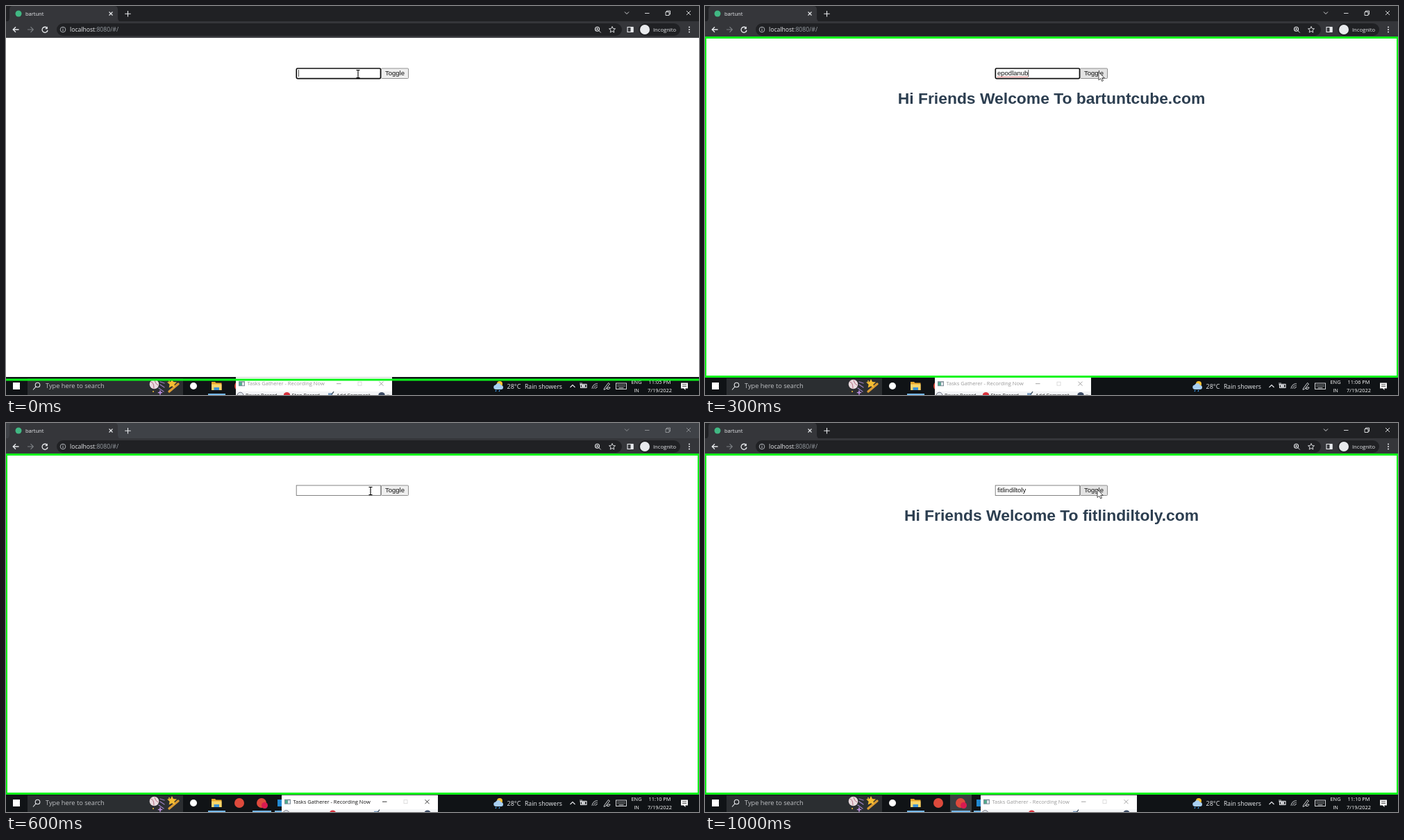
Animation, 998 px wide and 561 px high, one loop 1.1 s. Source, as an HTML page:

```html
<!DOCTYPE html>
<html lang="en">
<head>
<meta charset="utf-8">
<title>Toggle demo</title>
<style>
  html, body { margin: 0; width: 100%; height: 100%; overflow: hidden; background: #fff; }
  svg { display: block; width: 100vw; height: 100vh; }
  text { font-family: "Open Sans", "Noto Sans", sans-serif; fill: #e8eaed; white-space: pre; }
  .page text { font-family: "Liberation Sans", Arial, sans-serif; font-size: 9.5px; fill: #111; }
  .page #heading { font-size: 22.87px; font-weight: bold; fill: #2c3e50; text-anchor: middle; }
  .line { fill: none; stroke: #e8eaed; stroke-width: 1.1; }
  .mid { text-anchor: middle; }
  .clock text { font-size: 7.4px; text-anchor: middle; fill: #fff; }
  .recorder text { font-size: 7.5px; }
  .recorder .tool { font-size: 7.2px; fill: #222; }
  #frame { fill: none; stroke: #0bf51b; stroke-width: 3; }
</style>
</head>
<body>
<svg viewBox="0 0 998 561" preserveAspectRatio="none">
  <rect width="998" height="561" fill="#fff"/>

  <!-- browser -->
  <rect id="titlebar" width="998" height="23" fill="#202124"/>
  <path d="M0 22.5Q5 22.5 5 17V5Q5 0 10 0H156Q161 0 161 5V17Q161 22.5 166 22.5Z" fill="#35363a"/>
  <rect y="22" width="998" height="24" fill="#35363a"/>
  <rect y="45" width="998" height="1" fill="#4b4c50"/>
  <rect x="73" y="25" width="814" height="18" rx="9" fill="#202124"/>
  <rect x="911" y="25" width="60" height="18" rx="9" fill="#202124"/>
  <circle cx="18" cy="11" r="4.5" fill="#41b883"/>
  <text x="28" y="13.6" font-size="7.5">bartunt</text>
  <text x="92" y="37.1" font-size="8.65">localhost<tspan fill="#9aa0a6">:8080/#/</tspan></text>
  <text x="932" y="36.7" font-size="7.6">Incognito</text>
  <g class="line">
    <path d="M148.5 8.5l5 5m0-5l-5 5M175.500 7v8.500M171.200 11.200h8.500"/>
    <path d="M18.500 34H10.500M14 30.200L10.200 34L14 37.800" stroke-width="1.3"/>
    <path d="M31 34H39M35.500 30.200L39.300 34L35.500 37.800" stroke="#7d8084"/>
    <path d="M59 31.500A4 4 0 1 0 60 35" stroke-width="1.3"/>
    <circle cx="82" cy="34" r="3.800" stroke="#bdc1c6" stroke-width=".9"/>
    <path d="M82 33.500v2.600M82 31.600v1" stroke="#bdc1c6"/>
    <circle cx="851.500" cy="33.200" r="3"/>
    <path d="M853.700 35.500l3 3M850 33.200h3M851.500 31.700v3" stroke-width=".9"/>
    <path d="M873 29.500l1.300 3 3.200.3-2.500 2.100.8 3.200-2.800-1.700-2.800 1.700.8-3.200-2.500-2.100 3.200-.3z" stroke-width=".9"/>
    <rect x="895" y="30.500" width="8" height="7"/>
  </g>
  <rect x="899.500" y="30.500" width="4" height="7" fill="#e8eaed"/>
  <circle cx="920" cy="34" r="7" fill="#e8eaed"/>
  <g fill="#e8eaed">
    <circle cx="984" cy="30.500" r="1"/><circle cx="984" cy="34" r="1"/><circle cx="984" cy="37.500" r="1"/>
    <path d="M59.800 29.500v3.800h-3.800z"/>
  </g>
  <g id="controls" class="line">
    <path d="M891 8.500l3 3 3-3M920 10.500h6.500M950 8.500h5v5h-5zM951.500 8.500v-1.500h5v5h-1.500M980 7l6 6m0-6l-6 6" stroke-width=".9"/>
  </g>

  <!-- page -->
  <g class="page">
    <rect id="field" fill="#fff"/>
    <text id="typed" x="421" y="100.400"></text>
    <path id="squiggle" stroke="#e33" stroke-width=".9" stroke-dasharray="1.500 .6"/>
    <rect id="caret" y="92" width=".8" height="10" fill="#222"/>
    <rect id="button" x="540.500" y="90" width="39" height="14.500" rx="1" stroke="#858585" stroke-width=".9"/>
    <text class="mid" x="560" y="100.400">Toggle</text>
    <text id="heading" x="499" y="140.800"></text>
  </g>

  <!-- taskbar -->
  <rect y="535" width="998" height="26" fill="#101316"/>
  <rect x="31" y="537" width="224" height="24" fill="#2b2e31"/>
  <rect x="10" y="543" width="10" height="10" fill="#fff"/>
  <circle cx="45.500" cy="546.500" r="3.300" class="line"/>
  <path d="M43 549l-4 4.500" class="line"/>
  <text x="57" y="551.400" font-size="9.250" fill="#b8babd" style="fill:#c0c2c5">Type here to search</text>
  <g fill="none" stroke-linecap="round">
    <circle cx="213.500" cy="545.500" r="6.800" fill="#e9dbe0"/>
    <path d="M209 542q4 1 4 9M214 540q1 5 5 7" stroke="#b4697f" stroke-width="1"/>
    <path d="M222 542l6 2M222 546l6 4M220 551l7 5" stroke="#9a7fc0" stroke-width="1.300"/>
    <path d="M235 556L248 545" stroke="#d99a33" stroke-width="3.400"/>
    <path d="M239 538l2 4 5 .5-3.600 3.300 1 4.700-4.400-2.300-4.300 2.300.9-4.700-3.600-3.300 5-.5z" fill="#f5bd32"/>
    <path d="M222 555v5M219.500 557.500h5" stroke="#c493ea" stroke-width="1.600"/>
    <path d="M212 556h.1M235 541h.1" stroke="#e8b63b" stroke-width="2"/>
  </g>
  <circle cx="270" cy="548" r="5" fill="#fff"/>
  <path d="M296 542h5l1.500 1.500h8V554H296z" fill="#e9a92c"/>
  <path d="M296 545.500h14.500V554H296z" fill="#fbd66c"/>
  <rect x="299.500" y="550" width="7.500" height="4" fill="#3f94d4"/>
  <rect id="active" x="353" y="536" width="31" height="25" fill="#3b3e41"/>
  <circle cx="336" cy="548" r="7" fill="#dd4a3c"/>
  <circle cx="368" cy="548" r="7" fill="#dd4a3c"/>
  <circle cx="372.500" cy="551.500" r="4.500" fill="#d81b50"/>
  <rect x="391" y="543" width="10" height="10" fill="#2188d0"/>
  <path d="M291 560h25M355 560h27M387 560h14" stroke="#76b9ed" stroke-width="2"/>

  <circle cx="711" cy="545" r="4" fill="#f8c235"/>
  <path d="M705 553a3.300 3.300 0 0 1 0-6.500a4.300 4.300 0 0 1 8 .5a3 3 0 0 1 0 6z" fill="#a9d0f3"/>
  <path d="M706 554l-1 2M711 554l-1 2" stroke="#42a0ee" stroke-width="1.300"/>
  <text x="721.500" y="551.500" font-size="9">28°C</text>
  <text x="747" y="551.500" font-size="8.700">Rain showers</text>
  <g class="line">
    <path d="M812.500 550l3.500-3.500 3.500 3.500"/>
    <rect x="827.500" y="545.500" width="8.500" height="5"/>
    <path d="M844 552a8 8 0 0 1 8-7.500M846.500 552a5.500 5.500 0 0 1 5.500-5M849 552a3 3 0 0 1 3-2.500" stroke="#a5a8ab"/>
    <path d="M861.500 551.500l6-8 2 1.500-6 7.500-2.500.8zM865 552q4 2 5-2q-3-1-5 2" stroke-width=".9"/>
    <rect x="878.500" y="544" width="15" height="8.500" stroke-width=".9"/>
    <path d="M880.500 546.500h11.500M880.500 548.500h11.500" stroke-width=".9" stroke-dasharray="1 1"/>
    <path d="M882.500 550.700h7" stroke-width=".9"/>
  </g>
  <rect x="829" y="546.500" width="5" height="3" fill="#e8eaed"/>
  <path d="M827 543v4M829 543v4" stroke="#e8eaed" stroke-width=".8"/>
  <path d="M972 543.500h10v8h-3.500v2.500l-2.700-2.500H972z" fill="#f4f4f4"/>
  <path d="M974 546h6M974 548.500h6" stroke="#333" stroke-width=".8"/>
  <g class="clock">
    <text x="908" y="545.200">ENG</text><text x="908" y="556.600">IN</text>
    <text id="time" x="941.500" y="545.200"></text><text x="941.500" y="556.600">7/19/2022</text>
  </g>

  <!-- recorder window, local origin at its top left corner -->
  <g id="recorder" class="recorder">
    <rect width="225" height="30" fill="#fff"/>
    <rect y="20.500" width="225" height="10" fill="#f3f4f6"/>
    <rect x="4" y="6" width="9" height="7" fill="#7c8b96"/>
    <rect x="5" y="7.500" width="3.500" height="4.500" fill="#4fae8f"/>
    <rect x="9" y="7.500" width="3" height="4.500" fill="#e5eaee"/>
    <text id="caption" x="16.500" y="12.200">Tasks Gatherer - Recording Now</text>
    <path id="buttons" d="M145 9.500h6.500M206.500 6.500l6 6m0-6l-6 6" fill="none" stroke-width=".9"/>
    <rect x="176" y="7" width="5" height="5" fill="none" stroke="#d5d5d5" stroke-width=".8"/>
    <circle cx="6.500" cy="26.500" r="4.500" fill="#dfe5ea" stroke="#667" stroke-width=".9"/>
    <circle cx="73.500" cy="26.500" r="4.800" fill="#d9323d"/>
    <path d="M133 23h6v5h-6z" fill="#7a9cc0"/><path d="M138 25l3-4" stroke="#345" stroke-width="1.200"/>
    <circle cx="210" cy="26.500" r="4.800" fill="#3b4a63"/>
    <path d="M217 25.500h4l-2 2z" fill="#222"/>
    <text class="tool" x="14" y="29">Pause Record</text>
    <text class="tool" x="80.500" y="29">Stop Record</text>
    <text class="tool" x="145" y="29">Add Comment</text>
  </g>

  <rect id="frame"/>
  <path id="beam" d="M-2.500-5.500h2l.5.600.5-.6h2M0-5v10M-2.500 5.500h2l.5-.6.5.6h2" fill="none" stroke="#000" stroke-width="1.100"/>
  <path id="arrow" d="M0 0V11.500L2.700 9L4.600 13L6.500 12.200L4.700 8.300H8.300Z" fill="#fff" stroke="#222" stroke-width=".8"/>
</svg>
<script>
const STEP = 100;
const A = "bartuntcube", B = "epodlanub", C = "fitlindiltoly";

const scenes = [
  { beam: [507, 98], focus: true, caret: true, bar: true, time: "11:05" },
  { typed: A, arrow: [551, 97], focus: true, caret: true },
  { typed: A, title: A, beam: [507, 98] },
  { typed: B, title: A, arrow: [567, 95.5], focus: true, caret: true },
  { typed: B, title: B, beam: [507, 98] },
  { typed: C, title: B, arrow: [565, 98], focus: true },
  { beam: [525, 98], blurred: true, late: true },
  { beam: [525, 98], focus: true, bar: true, late: true },
  { typed: C, arrow: [565, 96], focus: true, late: true },
  { typed: C, title: C, arrow: [565, 96], late: true },
  { typed: C, title: C, arrow: [565, 96], late: true },
];

const el = id => document.getElementById(id);
const set = (id, attrs) => {
  for (const [name, value] of Object.entries(attrs)) el(id).setAttribute(name, value);
};
const show = (id, on) => { el(id).style.display = on ? "" : "none"; };
const box = (x, y, width, height) => ({ x, y, width, height });

function place(id, point) {
  show(id, point);
  if (point) set(id, { transform: `translate(${point})` });
}

function draw(s) {
  el("typed").textContent = s.typed || "";
  el("heading").textContent = s.title ? `Hi Friends Welcome To ${s.title}.com` : "";
  el("time").textContent = `${s.time || (s.late ? "11:10" : "11:06")} PM`;

  const end = 421 + (s.typed ? el("typed").getComputedTextLength() : 0);
  set("caret", { x: end });
  show("caret", s.caret);
  set("squiggle", { d: `M421 102.2H${end}` });
  show("squiggle", s.typed && s.focus);
  set("field", s.focus
    ? { ...box(418.3, 90, 121.2, 14.6), rx: 1.5, stroke: "#101010", "stroke-width": 1.7 }
    : { ...box(418.2, 90, 121.5, 14.5), rx: 0, stroke: "#767676", "stroke-width": 0.9 });
  set("button", { fill: s.arrow ? "#e3e3e3" : "#efefef" });

  set("titlebar", { fill: s.blurred ? "#3f4247" : "#202124" });
  set("controls", { opacity: s.blurred ? 0.5 : 1 });
  show("active", s.late && !s.blurred);
  set("recorder", { transform: s.late ? "translate(397 536.7)" : "translate(331 535.2)" });
  el("caption").style.fill = s.blurred ? "#111" : "#999";
  set("buttons", { stroke: s.blurred ? "#222" : "#999" });

  set("frame", s.bar ? box(-3, 539, 1004, 30) : box(0.5, 45.5, 997, 489));
  place("beam", s.beam);
  place("arrow", s.arrow);
}

let current = -1;
function tick() {
  const index = Math.floor(performance.now() / STEP) % scenes.length;
  if (index !== current) draw(scenes[current = index]);
  requestAnimationFrame(tick);
}
tick();
</script>
</body>
</html>
```
